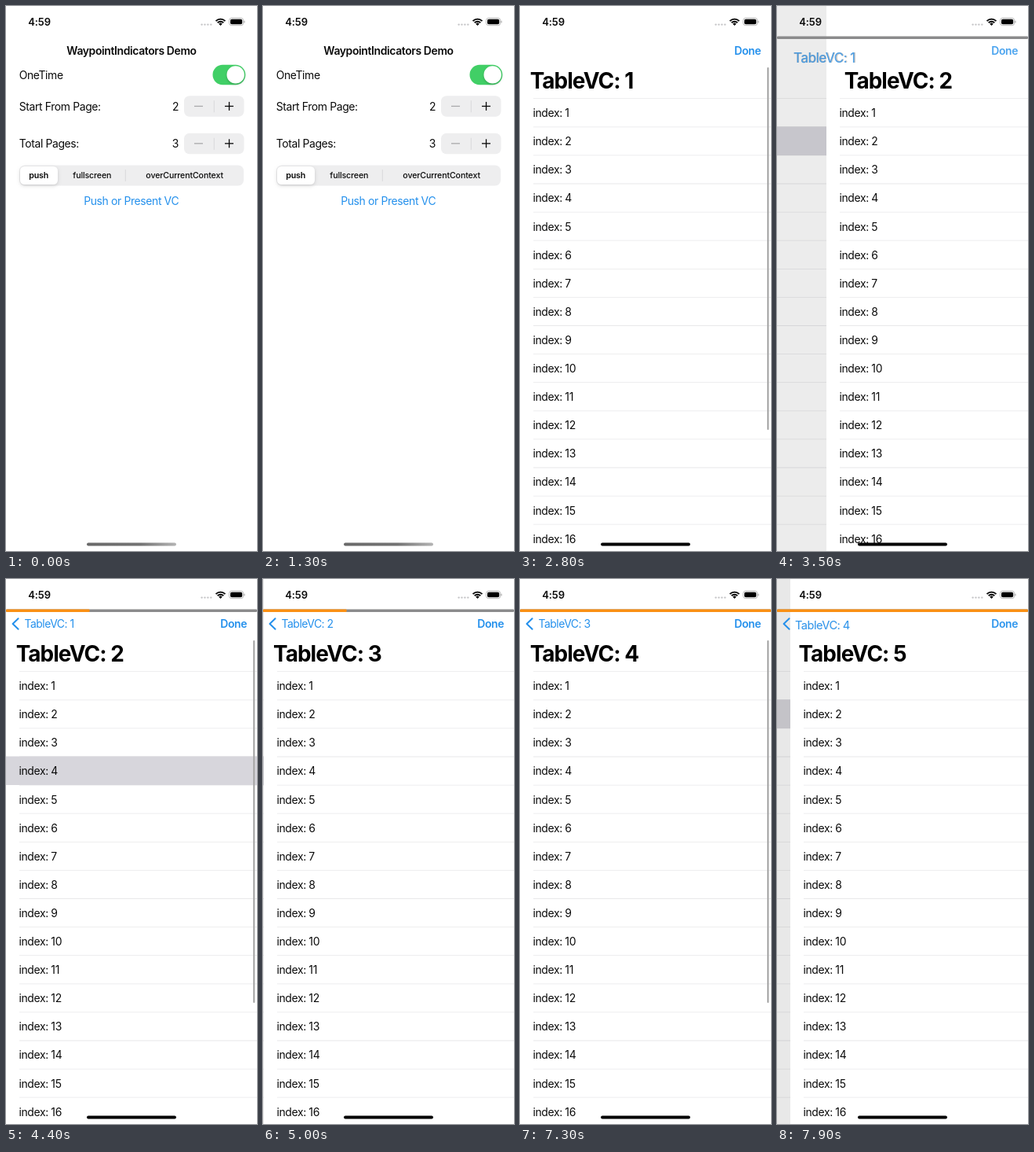
An HTML page with a canvas for the animation above (8000 ms loop, 320 by 693 pixels).

```html
<!DOCTYPE html>
<html lang="en">
<head>
<meta charset="utf-8">
<title>Paged table demo</title>
<style>
html, body { margin: 0; width: 100%; height: 100%; overflow: hidden; background: #fff; }
canvas { display: block; }
</style>
</head>
<body>
<canvas id="stage" width="320" height="693"></canvas>
<script>
const ctx = document.getElementById('stage').getContext('2d');
const W = 320, H = 693, LOOP = 8000;
const BODY = 13.95, LARGE = 27.9, ROW = 36.1, LIST_TOP = 117.7;
const BLUE = '#2490ec', INK = '#0a0a0a', TRACK = '#eeeeef', LINE = '#e8e8ea';

// start: transition begins, shown: transition done, tap: a row is selected
const screens = [
  { start: 1870, shown: 2680, row: 1, tap: 3300 },
  { start: 3336, shown: 4095, row: 3, tap: 4400 },
  { start: 4550, shown: 5270, row: 1, tap: 6300 },
  { start: 6325, shown: 7050, row: 1, tap: 7500 },
  { start: 7644, shown: 8400, row: 1, tap: 9000 }
];

const clamp = v => Math.max(0, Math.min(1, v));

// Critically damped spring: the share of the way still to go
function spring(ms, rate) {
  const a = Math.max(0, ms) * rate / 1000;
  return (1 + a) * Math.exp(-a);
}

function text(str, x, y, { size = BODY, weight = 400, color = INK, align = 'left', alpha = 1, track = -0.027 } = {}) {
  ctx.globalAlpha = alpha;
  ctx.font = `${weight} ${size}px Inter, sans-serif`;
  ctx.letterSpacing = track * size + 'px';
  ctx.textAlign = align;
  ctx.fillStyle = color;
  ctx.fillText(str, x, y + size * 0.36);
  ctx.globalAlpha = 1;
}

function rect(x, y, w, h, color, r = 0) {
  ctx.fillStyle = color;
  ctx.beginPath();
  ctx.roundRect(x, y, w, h, r);
  ctx.fill();
}

function disc(x, y, r, color) {
  rect(x - r, y - r, 2 * r, 2 * r, color, r);
}

function withShadow(color, blur, dy, draw) {
  ctx.save();
  ctx.shadowColor = color;
  ctx.shadowBlur = blur;
  ctx.shadowOffsetY = dy;
  draw();
  ctx.restore();
}

function stepper(label, value, y) {
  text(label, 16.7, y);
  text(value, 220, y, { align: 'right' });
  rect(227, y - 13.5, 76.5, 26.5, TRACK, 7);
  rect(240, y - 1, 11, 1.3, '#a9a9ab');
  rect(264.8, y - 7.5, 0.9, 15, '#d6d6d8');
  rect(279, y - 1, 11, 1.3, INK);
  rect(283.9, y - 5.9, 1.3, 11, INK);
}

function home(t) {
  text('WaypointIndicators Demo', 160, 57, { weight: 600, align: 'center' });
  text('OneTime', 16.7, 87.5);
  rect(263.5, 74.7, 41.8, 25.5, '#41cf66', 12.7);
  withShadow('rgba(0,0,0,.2)', 3, 1.5, () => disc(292.7, 87.4, 11.2, '#fff'));
  stepper('Start From Page:', '2', 127.8);
  stepper('Total Pages:', '3', 175.2);
  rect(17, 202.5, 286, 26, TRACK, 7);
  withShadow('rgba(0,0,0,.16)', 4, 1.5, () => rect(18, 204, 48, 23, '#fff', 5.5));
  rect(151.8, 208, 0.9, 15, '#d6d6d8');
  const small = { size: 10.67, align: 'center', track: -0.014, weight: 500 };
  text('push', 41.7, 215.3, { ...small, weight: 600 });
  text('fullscreen', 109.8, 215.3, small);
  text('overCurrentContext', 227.6, 215.3, small);
  const alpha = t < 1000 ? 1 : 0.25 + 0.75 * clamp((t - 1000) / 300);
  text('Push or Present VC', 159.7, 248.3, { color: BLUE, align: 'center', alpha });
}

function table(t, s, x, y) {
  ctx.save();
  ctx.translate(Math.round(x), y);
  rect(0, 0, W, H + 10, '#fff');
  for (let i = 0; i < 16; i++) rect(17, LIST_TOP + i * ROW - 0.4, W, 0.8, LINE);
  if (t >= s.tap) rect(0, LIST_TOP + s.row * ROW - 0.6, W, ROW + 0.6, '#d7d6dc');
  for (let i = 0; i < 16; i++) text('index: ' + (i + 1), 16.5, LIST_TOP + (i + 0.5) * ROW + 0.4);
  ctx.globalAlpha = clamp((t - s.shown) / 100) * clamp(1 - (t - s.shown - 980) / 120);
  rect(315.1, 78, 2.2, 461, '#a8a8a8', 1.1);
  ctx.globalAlpha = 1;
  ctx.restore();
}

function chevron(alpha) {
  ctx.globalAlpha = alpha;
  ctx.strokeStyle = BLUE;
  ctx.lineWidth = 2;
  ctx.lineCap = ctx.lineJoin = 'round';
  ctx.beginPath();
  ctx.moveTo(15.6, 50.3);
  ctx.lineTo(8.6, 57);
  ctx.lineTo(15.6, 63.7);
  ctx.stroke();
  ctx.globalAlpha = 1;
}

// n: index of the screen on top, q: share of its transition still to go
function navBar(n, q, dy) {
  const name = i => 'TableVC: ' + i;
  const bold = { weight: 700, track: -0.0335 };
  const back = { color: BLUE, track: -0.035 };
  if (n > 0) {
    const grow = 1 + 1.06 * q, x = 23.5 - 10.8 * q, y = 57 + 38 * q;
    if (n > 1) text(name(n - 1), 23.5 - 90 * (1 - q), 57, { ...back, alpha: q * q });
    text(name(n), x, y, { ...bold, size: LARGE * grow / 2.06, alpha: q });
    text(name(n), x, y, { ...back, size: BODY * grow, alpha: 1 - q });
    chevron(n > 1 ? 1 : clamp(1 - 5 * q));
  }
  text(name(n + 1), 12.7 + W * q, 95 + dy, { ...bold, size: LARGE, color: '#000' });
  text('Done', 307, 57 + dy, { weight: 600, color: BLUE, align: 'right', alpha: 1 - q * (1 - q) });
}

function progressBar(t) {
  if (t < screens[1].start) return;
  const done = screens.slice(1, 4).reduce((sum, s) => sum + clamp((t - s.shown) / 100) / 3, 0);
  rect(0, 38.5, W, 3.4, '#8b8b8c', 1.2);
  if (done > 0) rect(0, 38.5, W * done, 3.4, '#fa9014', 1.2);
}

function homeIndicator(t) {
  const light = 1 - clamp((t - 1870) / 300);
  const gray = v => `rgb(${v * light} ${v * light} ${v * light})`;
  const fill = ctx.createLinearGradient(103, 0, 217, 0);
  fill.addColorStop(0, gray(105));
  fill.addColorStop(0.6, gray(115));
  fill.addColorStop(1, gray(180));
  rect(103, 682.4, 114, 4, fill, 2);
}

function statusBar() {
  text('4:59', 28.3, 20.3, { size: 13, weight: 600, track: -0.01 });
  for (let i = 0; i < 4; i++) disc(249.6 + 3.9 * i, 23.6, 1.2, '#c6c6c8');
  ctx.strokeStyle = '#000';
  ctx.lineCap = 'butt';
  for (const r of [8.4, 5.3, 1.6]) {
    ctx.lineWidth = r < 2 ? 3.2 : 1.9;
    ctx.beginPath();
    ctx.arc(273.5, 25, r, -Math.PI * 0.75, -Math.PI * 0.25);
    ctx.stroke();
  }
  ctx.strokeStyle = '#a6a6a6';
  ctx.lineWidth = 0.8;
  ctx.beginPath();
  ctx.roundRect(284.6, 15.3, 18, 9.4, 3);
  ctx.stroke();
  rect(286, 16.7, 15.2, 6.6, '#000', 1.8);
  rect(303.4, 18.4, 1.1, 3.2, '#a6a6a6', 0.6);
}

function draw(t) {
  rect(0, 0, W, H, '#fff');
  const n = screens.findLastIndex(s => t >= s.start);
  if (n < 1) home(t);
  if (n === 0) {
    const dy = H * spring(t - screens[0].start, 18.26);
    table(t, screens[0], 0, dy);
    navBar(0, 0, dy);
  } else if (n > 0) {
    const s = screens[n], p = spring(t - s.start, 18.26);
    table(t, screens[n - 1], -0.3 * W * (1 - p), 0);
    rect(0, 0, W, H, `rgba(0,0,0,${0.095 * (1 - p)})`);
    table(t, s, W * p, 0);
    navBar(n, spring(t - s.start - 37, 22), 0);
  }
  progressBar(t);
  statusBar();
  homeIndicator(t);
}

const begin = performance.now();
function tick() {
  draw((performance.now() - begin) % LOOP);
  requestAnimationFrame(tick);
}
tick();
</script>
</body>
</html>
```
